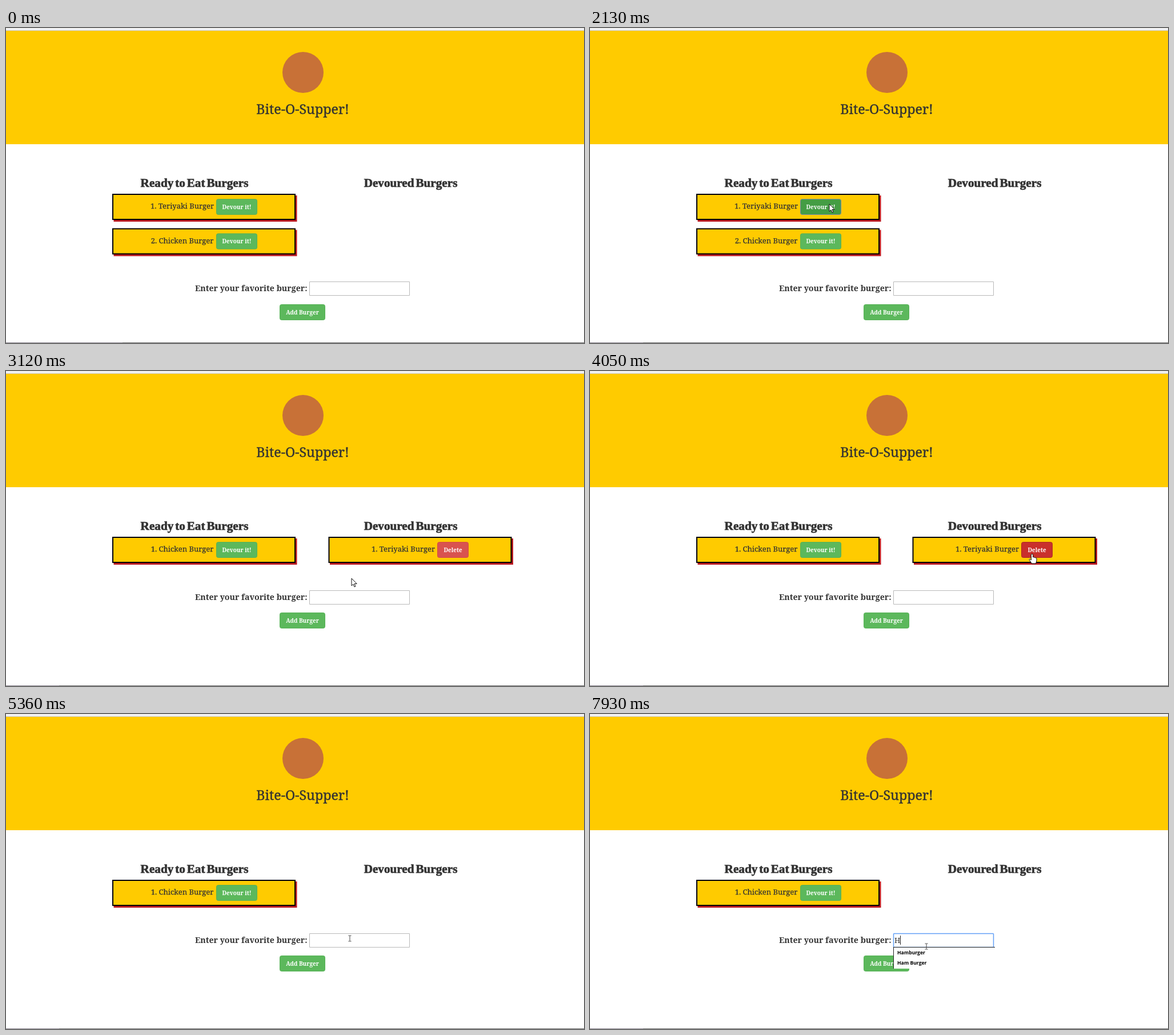
An HTML page with a canvas that plays this animation: 1012x553 px, repeating every 8 s.

```html
<!DOCTYPE html>
<html lang="en">
<head>
<meta charset="utf-8">
<title>Burger list</title>
<style>
html, body { margin: 0; width: 100%; height: 100%; overflow: hidden; background: #fff; }
canvas { display: block; width: 1012px; height: 553px; }
</style>
</head>
<body>
<canvas id="stage" width="1012" height="553"></canvas>
<script>
const ctx = document.getElementById('stage').getContext('2d');
const LOOP = 8000;
const SERIF = '"Noto Serif", serif';
const TITLE = '23.3px ' + SERIF;
const HEADING = 'bold 21.2px "Liberation Serif", serif';
const BODY = '13px ' + SERIF;
const PROMPT = 'bold 14.2px ' + SERIF;
const BUTTON = 'bold 9.95px ' + SERIF;
const OPTION = 'bold 8.6px "Open Sans", sans-serif';

const GREEN = { base: '#5cb85c', edge: '#55b255', hover: '#449d44', hoverEdge: '#398439', active: '#398439' };
const RED = { base: '#d9534f', edge: '#d64a45', hover: '#c9302c', hoverEdge: '#ac2925', active: '#ac2925' };

// Pointer moves: start, end, steps, target x, target y
const MOVES = [
  [410, 560, 3, 558, 408],
  [800, 960, 3, 429, 327],
  [1190, 1420, 4, 419, 309],
  [2960, 3120, 3, 605, 364],
  [3350, 3580, 4, 772, 324],
  [4050, 4120, 2, 776, 318],
  [4980, 5360, 6, 602, 394],
  [5440, 5590, 3, 593, 398],
  [7610, 7930, 5, 589, 408]
];

const between = (t, a, b) => t >= a && t < b;

function pointerAt(t) {
  let x = 792, y = 522;
  for (const [start, end, steps, tx, ty] of MOVES) {
    if (t < start) break;
    const gap = (end - start) / (steps - 1);
    const k = Math.min(1, (Math.floor((t - start) / gap + 1e-6) + 1) / steps);
    x += (tx - x) * k;
    y += (ty - y) * k;
  }
  return { x, y, shown: t >= 410 };
}

function rect(x, y, w, h, color) {
  ctx.fillStyle = color;
  ctx.fillRect(x, y, w, h);
}

// weight: width of an extra outline that thickens the letters
function label(str, x, y, font, { color = '#333', align = 'center', weight = 0 } = {}) {
  ctx.font = font;
  ctx.textAlign = align;
  ctx.fillStyle = ctx.strokeStyle = color;
  ctx.fillText(str, x, y);
  if (weight) {
    ctx.lineWidth = weight;
    ctx.strokeText(str, x, y);
  }
}

function heading(str, x) {
  ctx.wordSpacing = '-2.4px';
  label(str, x, 279, HEADING, { weight: 0.7 });
  ctx.wordSpacing = '0px';
}

function button(str, x, y, w, skin, state = {}) {
  const { hover, active, focus } = state;
  ctx.beginPath();
  ctx.roundRect(x + 0.5, y + 0.5, w - 1, 27, 3);
  ctx.fillStyle = active ? skin.active : hover ? skin.hover : skin.base;
  ctx.fill();
  ctx.strokeStyle = focus ? '#6d86b4' : hover ? skin.hoverEdge : skin.edge;
  ctx.lineWidth = 1;
  ctx.stroke();
  label(str, x + w / 2, y + 17.7, BUTTON, { color: '#fff' });
}

function card(x, y, str, textX) {
  rect(x + 2.5, y + 3, 321, 46, '#bb1a22');
  rect(x, y, 321, 46, '#000');
  rect(x + 2, y + 2, 317, 42, '#ffcb00');
  label(str, textX, y + 26, BODY, { weight: 0.25 });
}

function header(t) {
  rect(0, 0, 1012, 553, '#fff');
  rect(0, 0, 1012, 4, '#f1f1f1');
  rect(0, 4, 1012, 200, '#ffcb00');
  rect(0, 4, 1012, 1, '#cfcbbd');
  ctx.beginPath();
  ctx.arc(520, 78, 36, 0, Math.PI * 2);
  ctx.fillStyle = '#c87137';
  ctx.fill();
  label('Bite-O-Supper!', 519.5, 151, TITLE, { weight: 0.4 });
  heading('Ready to Eat Burgers', 330);
  heading('Devoured Burgers', 708.5);
  rect(0, 552, 1012, 1, '#666');
  rect(0, 552, t < 2040 ? 204 : 93, 1, '#85808a');
}

function lists(t, p) {
  const over = (x, w) => p.shown && p.x >= x && p.x <= x + w && p.y >= 300 && p.y <= 328;
  const eaten = t >= 2420;
  const deleted = t >= 4900;
  const onDevour = over(368, 72) && !between(t, 2420, 2500);
  const onDelete = over(755, 55) && eaten && !deleted;

  card(186, 291, eaten ? '1. Chicken Burger' : '1. Teriyaki Burger', 308.5);
  button('Devour it!', 368, 300, 72, GREEN, {
    hover: onDevour,
    active: between(t, 2040, 2130),
    focus: between(t, 2040, 2420)
  });
  if (!eaten) {
    card(186, 351.5, '2. Chicken Burger', 308.5);
    button('Devour it!', 368, 360.5, 72, GREEN);
  } else if (!deleted) {
    card(564.5, 291, '1. Teriyaki Burger', 695.5);
    button('Delete', 755, 300, 55, RED, {
      hover: onDelete,
      active: between(t, 4420, 4580),
      focus: t >= 4420
    });
  }
  return onDevour || onDelete;
}

function form(t) {
  const y = t < 2420 ? 445 : 385;
  const focused = t >= 5820;
  const typed = t >= 6750;
  label('Enter your favorite burger:', 527.5, y + 17, PROMPT, { align: 'right' });
  button('Add Burger', 479, y + (t < 2420 ? 40 : 39), 80, GREEN);

  ctx.beginPath();
  ctx.roundRect(531.5, y + 0.5, 175, 24, focused ? 1 : 0);
  ctx.fillStyle = '#fff';
  ctx.fill();
  ctx.strokeStyle = focused ? '#62a0f6' : '#b9b9b9';
  ctx.lineWidth = focused ? 1.5 : 1;
  ctx.stroke();
  if (!focused) return;

  if (typed) {
    label('H', 533, 402, BODY, { align: 'left' });
    rect(531, 409, 178, 38, '#fff');
    rect(531, 409, 178, 1, '#222');
    rect(531, 409, 1, 38, '#222');
    label('Hamburger', 538, 421.5, OPTION, { color: '#000', align: 'left' });
    label('Ham Burger', 538, 439.5, OPTION, { color: '#000', align: 'left' });
  }
  const since = t - (typed ? 6750 : 5820);
  if (Math.floor(since / 540) % 2 === 0) rect(typed ? 543 : 533, 389, 1, 16, '#222');
}

const ARROW = new Path2D('M0,0 V13 L3,10.3 L5,15 L7,14.1 L5,9.5 H9.2 Z');
const HAND = new Path2D('M-1.6,1.2 Q0,-.8 1.6,1.2 V5.8 Q3,5 4.2,6.5 Q5.6,5.8 6.4,7.2 Q8,7 8,8.8 V12 L6.6,17 H-.6 L-4.8,10.6 Q-5,8.8 -3.4,9.2 L-1.6,11 Z');
const BEAM = new Path2D('M-2.5,-5 H-.6 L0,-4.5 L.6,-5 H2.5 M0,-4.5 V4.5 M-2.5,5 H-.6 L0,4.5 L.6,5 H2.5');

function pointer(t, p, onButton) {
  if (!p.shown) return;
  const clicked = between(t, 2130, 2500) || between(t, 4580, 4980);
  const onInput = t >= 4980 && p.x < 707 && p.y > 385;
  ctx.save();
  ctx.translate(p.x, p.y);
  ctx.lineJoin = 'round';
  ctx.lineWidth = 1;
  if (onInput) {
    ctx.strokeStyle = '#444';
    ctx.stroke(BEAM);
  } else {
    const shape = onButton && !clicked ? HAND : ARROW;
    ctx.fillStyle = '#fff';
    ctx.strokeStyle = '#111';
    ctx.fill(shape);
    ctx.stroke(shape);
  }
  ctx.restore();
}

function draw(now) {
  const t = now % LOOP;
  const p = pointerAt(t);
  header(t);
  const onButton = lists(t, p);
  form(t);
  pointer(t, p, onButton);
}

const began = performance.now();
function tick() {
  draw(performance.now() - began);
  requestAnimationFrame(tick);
}
tick();
</script>
</body>
</html>
```
